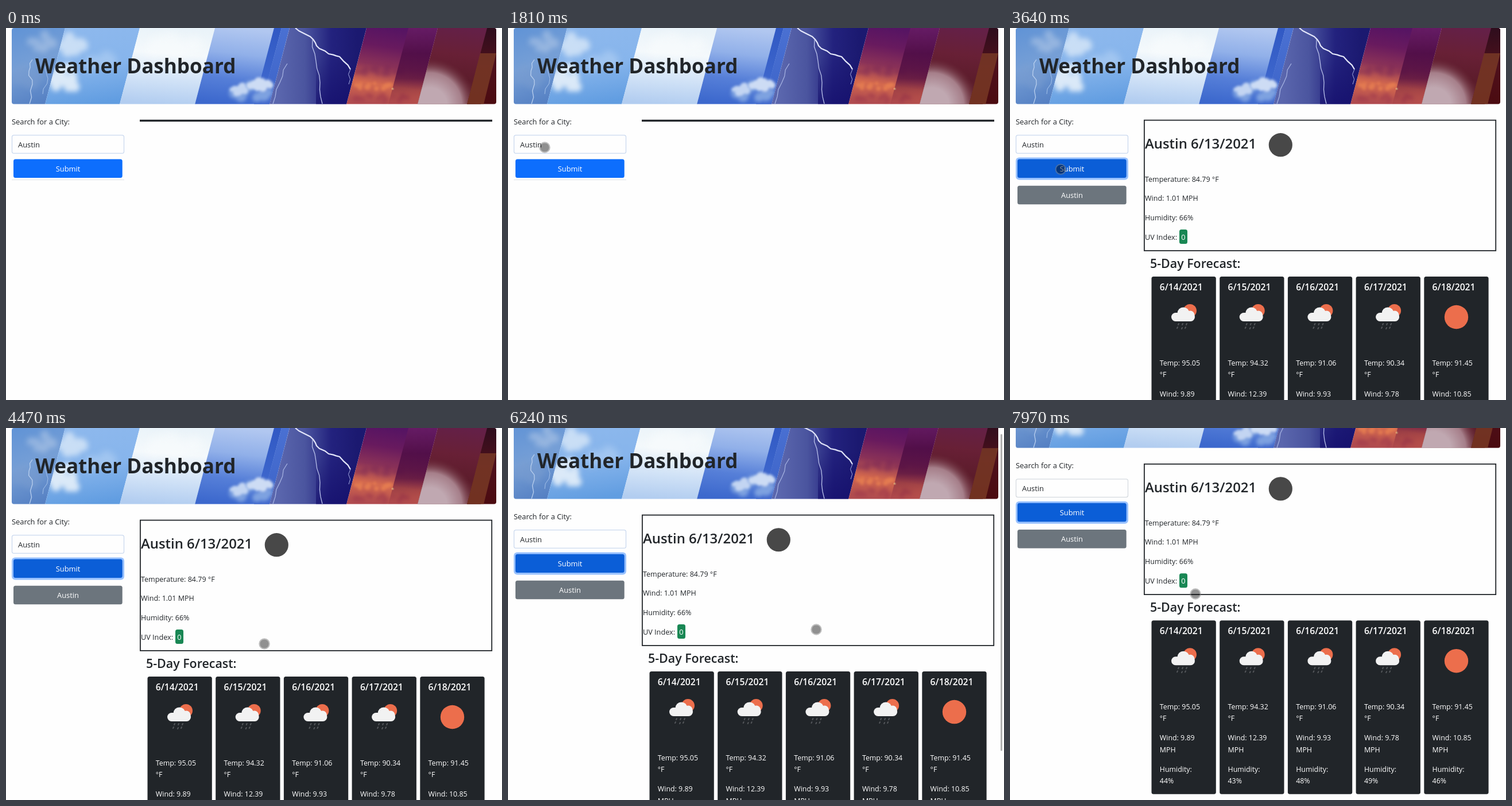
Recreate the animation shown at these times as an HTML page with a canvas. Size 864 by 648 pixels, loop 8 s.

```html
<!DOCTYPE html>
<html lang="en">
<head>
<meta charset="utf-8">
<title>Weather Dashboard</title>
<style>
html, body { margin: 0; width: 100%; height: 100%; overflow: hidden; background: #fefefe; }
canvas { display: block; width: 864px; height: 648px; }
</style>
</head>
<body>
<canvas id="stage" width="864" height="648"></canvas>
<script>
const W = 864, H = 648, LOOP = 8000, MAX_SCROLL = 97.8;
const INK = '#212529', PAPER = '#fefefe';
const ctx = document.getElementById('stage').getContext('2d');

const clamp = v => Math.max(0, Math.min(1, v));
const smooth = u => u * u * (3 - 2 * u);
const ramp = (t, a, b) => clamp((t - a) / (b - a));

function rng(seed) {
  return () => (seed = (seed * 16807) % 2147483647) / 2147483647;
}

// ---- header picture, painted once ----
const banner = document.createElement('canvas');
banner.width = W;
banner.height = 133;
const b = banner.getContext('2d');

function blend(x0, y0, x1, y1, colors) {
  const g = b.createLinearGradient(x0, y0, x1, y1);
  colors.forEach((c, i) => g.addColorStop(i / (colors.length - 1), c));
  return g;
}

function strip(x, w, fill, detail) {
  b.save();
  b.beginPath();
  b.moveTo(x, 0);
  b.lineTo(x + w, 0);
  b.lineTo(x + w - 35, 133);
  b.lineTo(x - 35, 133);
  b.clip();
  b.fillStyle = fill;
  b.fillRect(x - 40, 0, w + 45, 133);
  if (detail) detail();
  b.restore();
}

// A soft cloud made of overlapping seeded puffs.
function cloud(x, y, w, h, size, color, seed, blur = 3) {
  const r = rng(seed);
  b.filter = `blur(${blur}px)`;
  b.fillStyle = color;
  b.beginPath();
  for (let i = 0; i < 18; i++) {
    const a = r() * 6.283, d = Math.sqrt(r()), s = size * (0.5 + 0.5 * r());
    const cx = x + Math.cos(a) * d * w, cy = y + Math.sin(a) * d * h;
    b.moveTo(cx + s, cy);
    b.arc(cx, cy, s, 0, 6.283);
  }
  b.fill();
  b.filter = 'none';
}

function bolt(points, width, color, seed) {
  const r = rng(seed);
  b.beginPath();
  b.moveTo(...points[0]);
  for (let i = 1; i < points.length; i++) {
    const [x0, y0] = points[i - 1], [x1, y1] = points[i];
    for (let k = 1; k <= 3; k++) {
      const j = k < 3 ? (r() - 0.5) * 5 : 0;
      b.lineTo(x0 + (x1 - x0) * k / 3 + j, y0 + (y1 - y0) * k / 3);
    }
  }
  b.strokeStyle = color;
  b.lineWidth = width;
  b.lineJoin = 'round';
  b.stroke();
}

function paintBanner() {
  b.beginPath();
  b.roundRect(10, 0, 844, 132.4, 4);
  b.clip();

  strip(-20, 123, blend(10, 0, 60, 132, ['#6093d6', '#769fd6', '#5580c3']), () => {
    cloud(60, 25, 25, 14, 9, 'rgba(176,199,230,.6)', 11, 5);
    cloud(38, 85, 22, 16, 9, 'rgba(125,157,207,.5)', 5, 5);
    bolt([[46, 55], [40, 75], [46, 98], [41, 132]], 1.3, '#b9cfee', 4);
    bolt([[70, 62], [73, 88], [64, 115]], 1, '#a3c0e8', 9);
  });
  strip(103, 130, blend(130, 0, 150, 132, ['#8db8ed', '#87b5ec', '#619de1']), () => {
    cloud(112, 28, 22, 14, 11, 'rgba(222,235,249,.75)', 21, 5);
    cloud(102, 88, 22, 28, 11, 'rgba(236,244,251,.85)', 23, 4);
    cloud(160, 58, 26, 12, 10, 'rgba(178,208,243,.6)', 29, 6);
  });
  strip(233, 131, blend(280, 0, 270, 132, ['#eaf3f9', '#f4f9fc', '#d2e3f7', '#b2cdf0']), () => {
    cloud(290, 30, 40, 12, 16, 'rgba(252,254,254,.5)', 37, 8);
  });
  strip(364, 130, blend(400, 0, 385, 132, ['#b1c7f0', '#91b0e9', '#567fd8', '#3c68cd']), () => {
    strip(467, 13, blend(0, 0, 0, 90, ['#3159c4', '#3d66cc']));
    strip(480, 14, blend(0, 0, 0, 90, ['#4a70d2', '#4168cc']));
    cloud(430, 112, 34, 13, 10, '#7ea2e0', 43, 3);
    cloud(442, 98, 24, 6, 8, '#cddcf4', 47, 2);
    cloud(405, 107, 12, 7, 7, '#c3d5f2', 53, 2);
  });
  strip(494, 134, blend(475, 0, 612, 0, ['#5a66ad', '#4b559f', '#23227e', '#1b1970']), () => {
    b.fillStyle = blend(0, 50, 0, 132, ['rgba(20,14,108,0)', 'rgba(20,14,108,.7)']);
    b.fillRect(540, 50, 80, 83);
    bolt([[504, 0], [530, 15], [541, 31], [562, 45], [581, 50], [600, 72]], 2.2, '#e3e6fa', 17);
    bolt([[534, 20], [540, 58], [547, 95], [551, 132]], 1.3, '#b8c0ea', 19);
    bolt([[600, 72], [597, 98]], 1, '#a3aade', 14);
    bolt([[490, 62], [477, 95], [465, 132]], 1.2, '#a9b6e4', 12);
  });
  strip(628, 124, blend(670, 0, 650, 132, ['#561463', '#681a5e', '#8a3258', '#d4694e', '#b14c50']), () => {
    cloud(650, 76, 40, 6, 6, 'rgba(118,36,84,.45)', 67);
    cloud(640, 101, 36, 5, 5, 'rgba(234,130,82,.75)', 71, 2);
    cloud(654, 122, 48, 5, 5, 'rgba(157,55,75,.6)', 73);
    b.fillStyle = '#ffd087';
    b.beginPath();
    b.arc(674, 106, 2, 0, 7);
    b.fill();
  });
  strip(701, 51, blend(0, 0, 0, 132,
    ['rgba(108,30,100,.7)', 'rgba(76,12,68,.8)', 'rgba(76,10,62,.7)', 'rgba(140,40,60,.15)']));
  strip(752, 110, blend(780, 0, 765, 132, ['#642047', '#682036', '#5c1c2b', '#662b33']), () => {
    const haze = b.createRadialGradient(738, 134, 30, 738, 134, 82);
    haze.addColorStop(0, '#c0a8b1');
    haze.addColorStop(0.5, '#a67f8a');
    haze.addColorStop(1, 'rgba(104,38,52,0)');
    b.fillStyle = haze;
    b.fillRect(710, 40, 120, 93);
  });
  strip(838, 60, blend(840, 0, 840, 132, ['#2e0d1d', '#4e101c', '#4b0b10']));
  b.fillStyle = 'rgba(128,64,40,.72)';
  b.beginPath();
  b.moveTo(826, 44);
  b.lineTo(854, 44);
  b.lineTo(832, 133);
  b.lineTo(803, 133);
  b.fill();
}

// ---- page pieces ----
function text(str, x, y, size, color = INK, weight = 400, align = 'left') {
  ctx.font = `${weight} ${size}px "Open Sans", "Noto Sans", sans-serif`;
  ctx.fillStyle = color;
  ctx.textAlign = align;
  ctx.fillText(str, x, y);
}

function box(x, y, w, h, r, fill) {
  ctx.beginPath();
  ctx.roundRect(x, y, w, h, r);
  ctx.fillStyle = fill;
  ctx.fill();
}

function disc(x, y, r, fill) {
  ctx.beginPath();
  ctx.arc(x, y, r, 0, 7);
  ctx.fillStyle = fill;
  ctx.fill();
}

function rainIcon(x, y) {
  disc(x + 10.5, y - 10.5, 11.5, '#ec6e4c');
  disc(x - 1, y - 6, 10.5, '#f2f2f2');
  box(x - 22, y - 7, 41, 15, 7.5, '#f2f2f2');
  disc(x + 11, y - 3, 7.5, '#f2f2f2');
  ctx.strokeStyle = '#53565a';
  ctx.lineWidth = 2;
  ctx.lineCap = 'round';
  ctx.beginPath();
  for (const [dx, dy] of [[-9, 12], [-2, 12], [5, 12], [-11, 18], [-3, 19], [3, 18]]) {
    ctx.moveTo(x + dx, y + dy);
    ctx.lineTo(x + dx - 1, y + dy + 2);
  }
  ctx.stroke();
}

const days = [
  ['6/14/2021', '95.05', '9.89', '44%'],
  ['6/15/2021', '94.32', '12.39', '43%'],
  ['6/16/2021', '91.06', '9.93', '48%'],
  ['6/17/2021', '90.34', '9.78', '49%'],
  ['6/18/2021', '91.45', '10.85', '46%']
];

function card([date, temp, wind, humidity], i, icons) {
  const x = 246.5 + i * 118.7, tx = x + 14.3;
  box(x, 433, 112.3, 302.5, 3.5, INK);
  text(date, tx, 457, 15.7, '#fff', 600);
  if (icons) {
    if (i < 4) rainIcon(x + 56.5, 503);
    else disc(x + 56.2, 503.5, 20.7, '#ec6e4c');
  }
  const lines = [
    ['Temp: ' + temp, 588], ['°F', 608], ['Wind: ' + wind, 642],
    ['MPH', 662.5], ['Humidity:', 696.5], [humidity, 716.5]
  ];
  for (const [s, y] of lines) text(s, tx, y, 12.4, '#fff');
}

function sidebar(t, scroll) {
  text('Search for a City:', 10, 168, 12.9);
  box(10, 186.3, 196, 32.4, 3.5, scroll > 50 ? '#ced4da' : '#bfd1ec');
  box(11, 187.3, 194, 30.4, 2.8, PAPER);
  text('Austin', 21, 207.5, 12.9);

  const hover = ramp(t, 2300, 2450), focus = ramp(t, 2550, 2700);
  if (focus) {
    ctx.globalAlpha = focus;
    box(10, 225.5, 196, 39, 6, '#98c1fe');
    ctx.globalAlpha = 1;
  }
  box(13, 228.6, 189.7, 32.4, 3.5, `rgb(${13 - 2 * hover},${110 - 16 * hover},${253 - 38 * hover})`);
  text('Submit', 108, 249.8, 12.9, '#fff', 400, 'center');

  if (t < 2820) {
    ctx.fillStyle = '#dee2e6';
    ctx.fillRect(10, 264, 196, 1);
  } else {
    box(13, 274.8, 189.7, 32.4, 3.5, '#6c757d');
    text('Austin', 108, 296, 12.9, '#fff', 400, 'center');
  }
}

function forecast(t) {
  if (t < 2880) {
    ctx.fillStyle = INK;
    ctx.fillRect(233, 159.7, 614, 3.4);
    return;
  }
  const icons = t >= 2960;
  ctx.strokeStyle = INK;
  ctx.lineWidth = 1.8;
  ctx.strokeRect(233.9, 160.6, 612.3, 227.3);
  text('Austin 6/13/2021', 235, 210, 23.9, INK, 600);
  if (icons) disc(471.3, 203.7, 20.6, '#484848');
  text('Temperature: 84.79 °F', 235, 267.5, 12.5);
  text('Wind: 1.01 MPH', 235, 301, 12.5);
  text('Humidity: 66%', 235, 335, 12.5);
  text('UV Index:', 235, 369, 12.7);
  box(295, 351, 14, 25, 3.5, '#198754');
  text('0', 302, 369, 12.7, '#fff', 400, 'center');
  text('5-Day Forecast:', 244, 418, 21.4, INK, 600);
  days.forEach((d, i) => card(d, i, icons));
}

// ---- pointer: time, x, y ----
const path = [
  [370, 820, 646], [1140, 115, 373], [1190, 115, 372], [1810, 64, 208],
  [2060, 64, 208], [2500, 88, 246], [3640, 88, 246], [4420, 449, 377],
  [4470, 450, 376], [4710, 473, 362], [4860, 473, 362], [4910, 474, 358],
  [5220, 598, 443], [5370, 598, 443], [5420, 586, 440], [5700, 520, 342],
  [5890, 537, 351], [7210, 537, 351], [7370, 521, 342], [7560, 521, 341],
  [7970, 323, 289], [LOOP, 323, 289]
];

function pointer(t) {
  const i = path.findIndex(p => p[0] > t);
  if (i < 1) return;
  const [t0, x0, y0] = path[i - 1], [t1, x1, y1] = path[i];
  const u = ramp(t, t0, t1), e = 0.6 * u + 0.4 * smooth(u);
  const x = x0 + (x1 - x0) * e, y = y0 + (y1 - y0) * e;
  disc(x, y, 7.8, 'rgba(0,0,0,.43)');
  ctx.strokeStyle = 'rgba(125,125,125,.5)';
  ctx.lineWidth = 2;
  ctx.beginPath();
  ctx.arc(x, y, 8.7, 0, 7);
  ctx.stroke();
}

function draw(t) {
  const scroll = MAX_SCROLL * smooth(ramp(t, 6193, 6450));
  ctx.fillStyle = PAPER;
  ctx.fillRect(0, 0, W, H);
  ctx.save();
  ctx.translate(0, -scroll);
  ctx.drawImage(banner, 0, 0);
  text('Weather Dashboard', 51, 78.5, 35.1, INK, 700);
  sidebar(t, scroll);
  forecast(t);
  ctx.restore();

  if (scroll > 0 && t < 6960) {
    ctx.globalAlpha = 1 - ramp(t, 6700, 6960);
    box(858, 2.7 + 0.863 * scroll, 3, 552, 1.5, '#b0b0b0');
    ctx.globalAlpha = 1;
  }
  pointer(t);
}

paintBanner();
const start = performance.now();
function tick() {
  draw((performance.now() - start) % LOOP);
  requestAnimationFrame(tick);
}
tick();
</script>
</body>
</html>
```
